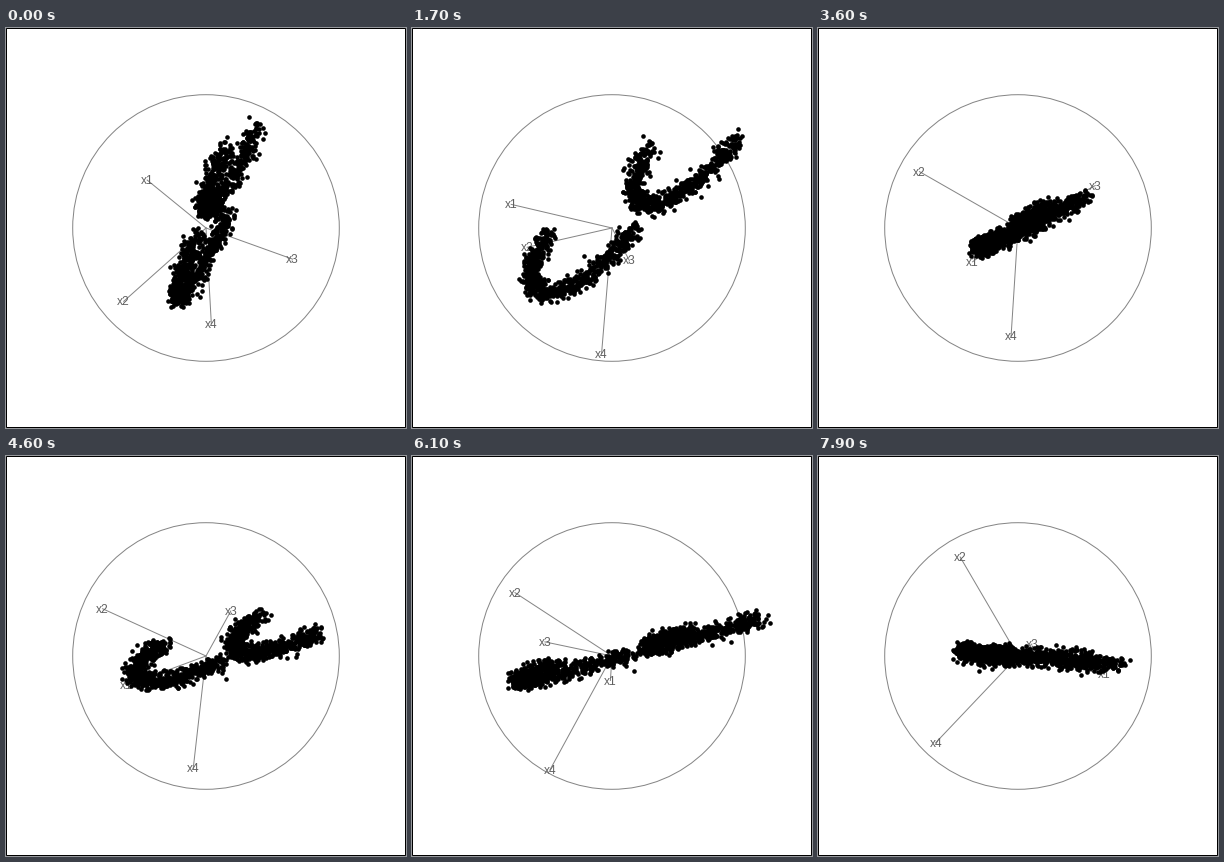
These frames come from a looping animation (400 by 400 pixels, 8 s). A matplotlib script:

```python
import numpy as np
import matplotlib.pyplot as plt
from matplotlib.animation import FuncAnimation

SIZE, DPI, FRAMES = 400, 100, 80
MID, RADIUS = 200, 133.3
PX = 72 / DPI
GREY = "#858585"

# Turning points of the tour: frame -> rough ends of axes x1..x4, in pixels
TURNS = {
    0: [(-59, -48), (-83, 74), (87, 31), (5, 96)],
    11: [(-121, -44), (-50, 57), (2, 21), (-23, 109)],
    27: [(-40, 41), (-122, -25), (29, 37), (-20, 119)],
    38: [(-44, 28), (-93, -65), (85, -56), (1, 98)],
    45: [(-77, 33), (-103, -48), (35, -49), (-6, 109)],
    55: [(-62, -15), (-76, -46), (-75, -22), (-52, 122)],
    69: [(69, 72), (-73, -50), (-30, 16), (-82, 100)],
    79: [(87, 18), (-58, -99), (14, -12), (-83, 87)],
}


def orthonormal(m):
    u, _, vt = np.linalg.svd(np.array(m, float), full_matrices=False)
    return u @ vt


def geodesic(a, b, t):
    """Turn the plane a into b at constant speed, spreading in-plane spin."""
    u, s, vt = np.linalg.svd(a.T @ b)
    s = np.clip(s, 0, 1)
    angle = np.arccos(s)
    start = a @ u
    normal = (b @ vt.T - start * s) / np.maximum(np.sin(angle), 1e-6)
    plane = start * np.cos(t * angle) + normal * np.sin(t * angle)
    r = u @ vt
    spin = t * np.arctan2(r[1, 0], r[0, 0])
    c, d = np.cos(spin), np.sin(spin)
    return plane @ u.T @ np.array([[c, -d], [d, c]])


def make_data(n=720, noise=0.035):
    """Two parallel half rings in four dimensions."""
    rng = np.random.default_rng(4)
    clusters = []
    for side in (-1, 1):
        phi = rng.uniform(0, np.pi, n)
        u = -0.035 + 0.53 * np.cos(phi)
        v = -0.29 + 0.43 * np.sin(phi)
        ring = np.column_stack([u, v, u, v])
        clusters.append(ring + side * 0.285 + rng.normal(0, noise, (n, 4)))
    return np.vstack(clusters)


times = list(TURNS)
planes = [orthonormal(m) for m in TURNS.values()]
data = make_data()


def plane_at(frame):
    k = min(np.searchsorted(times, frame, side="right") - 1, len(times) - 2)
    t = (frame - times[k]) / (times[k + 1] - times[k])
    return geodesic(planes[k], planes[k + 1], t)


fig = plt.figure(figsize=(SIZE / DPI, SIZE / DPI), dpi=DPI, facecolor="white")
ax = fig.add_axes([0, 0, 1, 1])
ax.set_xlim(0, SIZE)
ax.set_ylim(SIZE, 0)
ax.axis("off")

ax.add_patch(plt.Rectangle((0.5, 0.5), SIZE - 1, SIZE - 1, fill=False,
                           ec="black", lw=PX, snap=False))
ax.add_patch(plt.Circle((MID, MID), RADIUS, fill=False, ec=GREY, lw=PX))

spokes = [ax.plot([], [], color=GREY, lw=PX, zorder=2)[0] for _ in range(4)]
labels = [ax.text(0, 0, f"x{i + 1}", color="#606060", size=12 * PX,
                  family="Liberation Sans", ha="center", va="center",
                  zorder=3) for i in range(4)]
dots = ax.scatter([], [], s=(4.6 * PX) ** 2, c="black", linewidths=0, zorder=4)


def draw(frame):
    axes = plane_at(frame) * RADIUS
    for (x, y), spoke, label in zip(MID + axes, spokes, labels):
        spoke.set_data([MID, x], [MID, y])
        label.set_position((x, y + 1))
    dots.set_offsets(MID + data @ axes)
    return [*spokes, *labels, dots]


anim = FuncAnimation(fig, draw, frames=FRAMES, interval=100,
                     repeat=True, repeat_delay=0)
plt.show()
```
